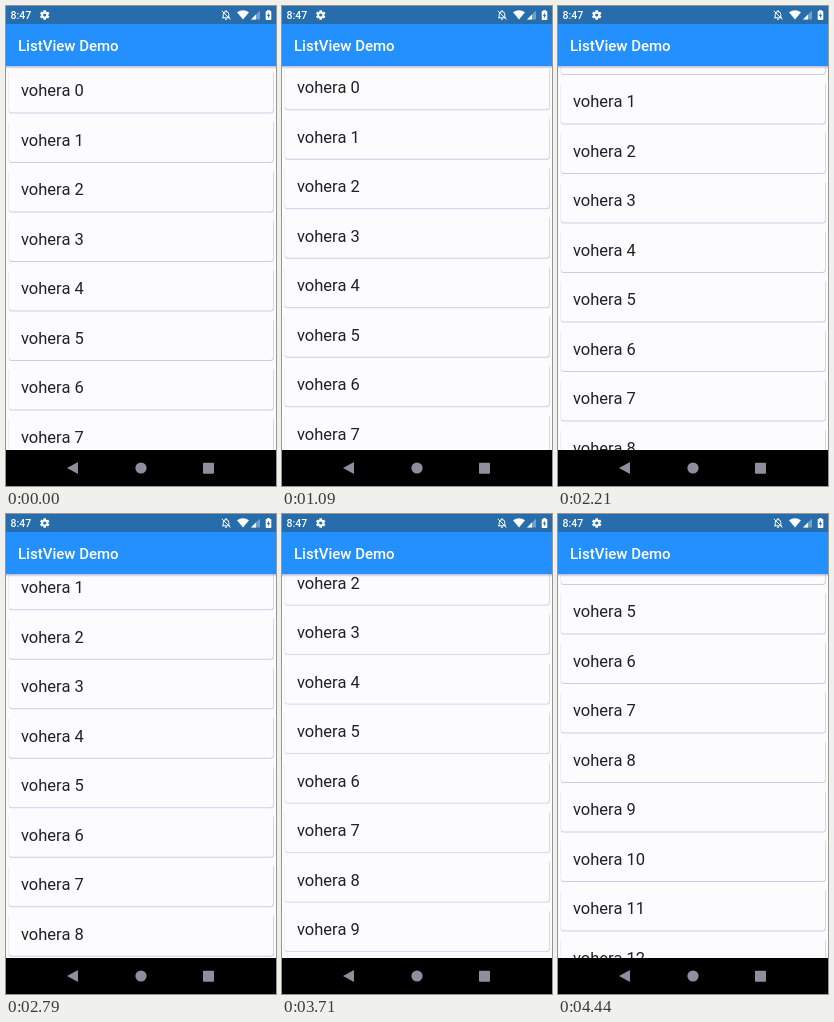
An HTML page with a canvas for the animation above (4.54 s loop, 270x480 px).

```html
<!DOCTYPE html>
<html lang="en">
<head>
<meta charset="utf-8">
<title>ListView Demo</title>
<style>
  html, body { margin: 0; width: 100%; height: 100%; overflow: hidden; background: #000; }
  canvas { display: block; width: 270px; height: 480px; }
</style>
</head>
<body>
<canvas id="stage" width="270" height="480"></canvas>
<script>
const ctx = document.getElementById('stage').getContext('2d');
const LOOP = 4540;
const ROW = 49.5;
const LIST_TOP = 60;
const LIST_BOTTOM = 444;
const PAPER = '#fcfcfe';

// Drag path as [time, scroll offset]; the screen only refreshes at the REFRESH times.
const DRAG = [[960, 0], [1090, 3.2], [2210, 38.5], [2790, 60.7], [3290, 96], [3710, 114.8], [4440, 234.5]];
const REFRESH = [0, 960, 1050, 1090, 1130, 1190, 1250, 1310, 1450, 1540, 1630,
  2210, 2330, 2400, 2480, 2730, 2790, 3020, 3110, 3290, 3490, 3600, 3710, 4010, 4090, 4440];

function scrollAt(time) {
  const t = REFRESH.filter(r => r <= time).pop();
  const next = DRAG.findIndex(point => point[0] >= t);
  if (next <= 0) return 0;
  const [t0, y0] = DRAG[next - 1];
  const [t1, y1] = DRAG[next];
  return y0 + (y1 - y0) * (t - t0) / (t1 - t0);
}

function rect(x, y, w, h, color) {
  ctx.fillStyle = color;
  ctx.fillRect(x, y, w, h);
}

function roundRect(x, y, w, h, r, color) {
  ctx.fillStyle = color;
  ctx.beginPath();
  ctx.roundRect(x, y, w, h, r);
  ctx.fill();
}

function polygon(points, color) {
  ctx.fillStyle = color;
  ctx.beginPath();
  points.forEach(([x, y]) => ctx.lineTo(x, y));
  ctx.fill();
}

function disc(x, y, r, color) {
  ctx.fillStyle = color;
  ctx.beginPath();
  ctx.arc(x, y, r, 0, Math.PI * 2);
  ctx.fill();
}

function line(x0, y0, x1, y1, width, color) {
  ctx.strokeStyle = color;
  ctx.lineWidth = width;
  ctx.beginPath();
  ctx.moveTo(x0, y0);
  ctx.lineTo(x1, y1);
  ctx.stroke();
}

function label(text, x, y, size, weight, color) {
  ctx.font = `${weight} ${size}px Roboto, sans-serif`;
  ctx.fillStyle = color;
  ctx.fillText(text, x, y);
}

function drawList(offset) {
  ctx.save();
  ctx.beginPath();
  ctx.rect(0, LIST_TOP, 270, LIST_BOTTOM - LIST_TOP);
  ctx.clip();
  rect(0, LIST_TOP, 270, LIST_BOTTOM - LIST_TOP, PAPER);
  const first = Math.floor(offset / ROW);
  for (let i = first; i < first + 9; i++) {
    const y = LIST_TOP + i * ROW - offset;
    roundRect(2.7, y + 5, 265.1, 42.4, 3, '#cfcde6');
    roundRect(3, y + 3, 264, 43.5, 3, PAPER);
    label(`vohera ${i}`, 15, y + 30.3, 16.5, 400, '#212121');
  }
  const shade = ctx.createLinearGradient(0, LIST_TOP, 0, LIST_TOP + 3);
  shade.addColorStop(0, 'rgba(125,115,170,.5)');
  shade.addColorStop(1, 'rgba(125,115,170,0)');
  rect(0, LIST_TOP, 270, 3, shade);
  ctx.restore();
}

function drawGear(x, y) {
  ctx.save();
  ctx.translate(x, y);
  for (let i = 0; i < 6; i++) {
    rect(-1.3, -4.7, 2.6, 3, '#fff');
    ctx.rotate(Math.PI / 3);
  }
  ctx.restore();
  disc(x, y, 3.6, '#fff');
  disc(x, y, 1.6, '#276dab');
}

function drawMutedBell(x, y) {
  ctx.strokeStyle = '#fff';
  ctx.lineWidth = 1;
  ctx.beginPath();
  ctx.moveTo(x - 4, y + 2.8);
  ctx.lineTo(x + 4, y + 2.8);
  ctx.moveTo(x - 2.8, y + 2.8);
  ctx.lineTo(x - 2.8, y - 0.6);
  ctx.arc(x, y - 0.6, 2.8, Math.PI, 0);
  ctx.lineTo(x + 2.8, y + 2.8);
  ctx.stroke();
  rect(x - 0.6, y - 4.8, 1.2, 1.5, '#fff');
  rect(x - 1, y + 3.6, 2, 1.1, '#fff');
  line(x - 4.2, y - 4.2, x + 4.4, y + 4.5, 1, '#fff');
}

function drawStatusBar() {
  rect(0, 0, 270, 18, '#276dab');
  label('8:47', 4.5, 12.8, 10.5, 500, '#fff');
  drawGear(38.7, 9);
  drawMutedBell(220, 9);

  ctx.fillStyle = '#fff';
  ctx.beginPath();
  ctx.moveTo(237, 13.6);
  ctx.lineTo(231, 6.3);
  ctx.quadraticCurveTo(237, 2.3, 243, 6.3);
  ctx.fill();

  polygon([[245, 13.5], [254, 13.5], [254, 4.5]], 'rgba(255,255,255,.35)');
  polygon([[245, 13.5], [250, 13.5], [250, 8.5]], '#fff');

  rect(261.2, 4, 2.6, 2, '#fff');
  roundRect(259.7, 5, 5.6, 9, 0.7, '#fff');
  polygon([[262.9, 6.4], [260.9, 10], [262.1, 10], [262.1, 12.5], [264.1, 8.9], [262.9, 8.9]], '#276dab');
}

function drawAppBar() {
  rect(0, 18, 270, 42, '#2490fe');
  label('ListView Demo', 12, 44.6, 15, 500, '#fff');
}

function drawNavBar() {
  const color = '#908d9f';
  rect(0, LIST_BOTTOM, 270, 36, '#000');
  polygon([[61, 462], [72, 456], [72, 468]], color);
  disc(135, 462, 5.6, color);
  roundRect(197, 456.7, 11, 11, 0.8, color);
}

function frame(now) {
  drawList(scrollAt(now % LOOP));
  drawStatusBar();
  drawAppBar();
  drawNavBar();
  requestAnimationFrame(frame);
}

frame(0);
</script>
</body>
</html>
```
